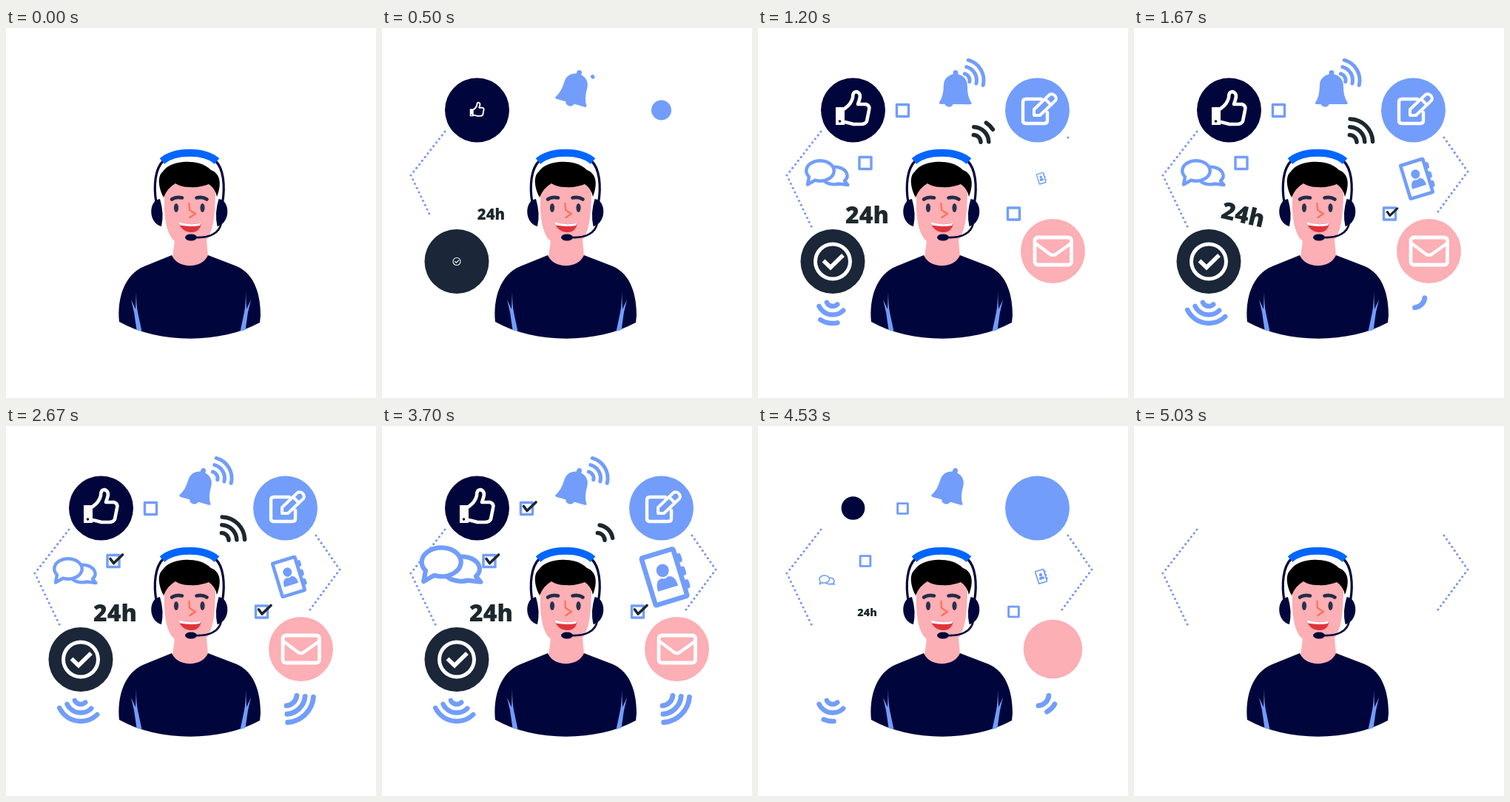
Recreate the animation shown at these times as an HTML page with a canvas. Size 500 by 500 pixels, loop 5.06 s.

```html
<!DOCTYPE html>
<html lang="en">
<head>
<meta charset="utf-8">
<title>Support agent</title>
<style>
html, body { margin: 0; width: 100%; height: 100%; overflow: hidden; background: #fff; }
canvas { display: block; width: 500px; height: 500px; }
</style>
</head>
<body>
<canvas id="stage" width="500" height="500"></canvas>
<script>
const ctx = document.getElementById('stage').getContext('2d');
const LOOP = 5060;
const NAVY = '#00063b', DARK = '#1b2638', BLUE = '#729dfb', PINK = '#fcafb4';
const WHITE = '#fff', INK = '#1d282e';
const RAD = Math.PI / 180;

// Motion rules: t and all times in ms.
function ease(t, from, to) {
  const p = Math.min(1, Math.max(0, (t - from) / (to - from)));
  return p * p * (3 - 2 * p);
}

// Grows from 0 to 1 at one time and shrinks back at another.
const life = (t, enter, leave, dur = 340) =>
  ease(t, enter, enter + dur) * (1 - ease(t, leave, leave + dur));

const bump = (t, from, to) =>
  t < from || t > to ? 0 : Math.sin(Math.PI * (t - from) / (to - from)) ** 2;

const swing = (t, from, period, turns) =>
  t < from || t > from + period * turns ? 0 : Math.sin(2 * Math.PI * (t - from) / period);

function fill(d, color) {
  ctx.fillStyle = color;
  ctx.fill(new Path2D(d));
}

function line(d, color, width) {
  ctx.strokeStyle = color;
  ctx.lineWidth = width;
  ctx.stroke(new Path2D(d));
}

function oval(x, y, rx, ry, color) {
  ctx.fillStyle = color;
  ctx.beginPath();
  ctx.ellipse(x, y, rx, ry, 0, 0, 2 * Math.PI);
  ctx.fill();
}

function rounded(x, y, w, h, r, color, width) {
  ctx.strokeStyle = color;
  ctx.lineWidth = width;
  ctx.beginPath();
  ctx.roundRect(x, y, w, h, r);
  ctx.stroke();
}

// Scales and turns a drawing about a point in stage coordinates.
function about(x, y, scale, draw, deg = 0) {
  if (scale < 0.01) return;
  ctx.save();
  ctx.translate(x, y);
  ctx.rotate(deg * RAD);
  ctx.scale(scale, scale);
  ctx.translate(-x, -y);
  draw();
  ctx.restore();
}

function mirrored(axis, draw) {
  draw();
  ctx.save();
  ctx.translate(2 * axis, 0);
  ctx.scale(-1, 1);
  draw();
  ctx.restore();
}

// Three arcs that open one after the other.
function waves(x, y, r, step, from, to, color, width, part) {
  ctx.strokeStyle = color;
  ctx.lineWidth = width;
  for (let i = 0; i < 3; i++) {
    const f = Math.min(1, part * 3 - i);
    if (f < 0.03) continue;
    const mid = (from + to) / 2, half = (to - from) / 2 * f;
    ctx.beginPath();
    ctx.arc(x, y, r + step * i, (mid - half) * RAD, (mid + half) * RAD);
    ctx.stroke();
  }
}

function dots(points, part) {
  const spots = [points[0]];
  for (let i = 1; i < points.length; i++) {
    const [x, y] = points[i - 1], dx = points[i][0] - x, dy = points[i][1] - y;
    const n = Math.round(Math.hypot(dx, dy) / 6.2);
    for (let k = 1; k <= n; k++) spots.push([x + dx * k / n, y + dy * k / n]);
  }
  for (const [x, y] of spots.slice(0, Math.round(spots.length * part))) {
    oval(x, y, 1.6, 1.6, '#7b97ec');
  }
}

function person() {
  fill('M214 210 V245 C215 265 219 281 228 288 L225 309 C232 328 265 328 273 309 L271 286 C280 275 283 255 283 212 L248 200 Z', PINK);
  fill('M224 307 C232 326 265 326 273 307 L312 322 C337 333 344 362 344 388 L343 398 C290 427 206 427 153 397 C150 365 160 333 187 322 Z', NAVY);
  mirrored(250, () => fill('M176 356 Q176 374 178 384 L183.500 410 L176.500 408 L173 384 L169 367 L175 380 Z', BLUE));
  mirrored(247.75, () => {
    line('M203 236 C199 212 202 190 212 180', NAVY, 3.2);
    fill('M208 231 C192 233 192 264 210 268 Q214 250 208 231 Z', NAVY);
    oval(230, 243, 3.1, 6, '#2b3150');
    line('M224 231.500 Q230 227.500 238 229.500', '#252b48', 4.6);
  });
  fill('M213 229 C206 216 204 200 212 194 C218 185 233 180 248 181 C262 181 271 186 277 192 C291 197 291 213 285 228 Q283 217 274 211 Q262 216 248 215 Q236 215 229 210 Q218 216 213 229 Z', '#000');
  ctx.lineCap = 'butt';
  line('M211 180 C228 165 268 165 285 180', '#0066ff', 10);
  ctx.lineCap = 'round';
  line('M291 263 C289 277 275 284 256 283', NAVY, 2.6);
  oval(250, 283, 8, 4.6, NAVY);
  line('M247.500 237 L248 246 M249 246.500 L256 251 L248.500 256', '#f9735a', 2.3);
  fill('M233 262 Q250 268 264 263 Q262 277 249 276 Q237 275 233 262 Z', '#e0343c');
  fill('M233 262 Q250 268 264 263 L262 267 Q249 269 235 266.500 Z', WHITE);
}

function thumb() {
  fill('M105 107 H117 V131 H105 Z', WHITE);
  oval(110.5, 126, 1.8, 1.8, NAVY);
  line('M117 109 Q126 103 128 94 Q128 86 133 86 Q140 88 137 97 L135 103 H146 Q152 105 150 111 L147 126 Q145 130 139 130 H129 Q122 128 117 127', WHITE, 4.6);
}

function tick() {
  oval(101, 315.5, 26, 26, WHITE);
  oval(101, 315.5, 21, 21, DARK);
  ctx.lineCap = 'butt';
  ctx.lineJoin = 'miter';
  line('M88.500 314.500 L98 323.500 L115 307', WHITE, 5.6);
}

function edit() {
  line('M383 96 H362 Q358 96 358 100 V125 Q358 129 362 129 H387 Q391 129 391 125 V114', WHITE, 4.4);
  line('M373 118 V110 L394 90 Q397 88 401 91 Q404 95 402 98 L381 118 Z M388 96 L396 104', WHITE, 4);
}

function envelope() {
  rounded(374, 283, 49.5, 37, 4, WHITE, 4.8);
  line('M375 291 L395 306 Q398.500 308 402 306 L423 291', WHITE, 4.4);
}

function bubble(x, y, rx, ry, start, end, tx, ty) {
  ctx.beginPath();
  ctx.ellipse(x, y, rx, ry, 0, start, end + 2 * Math.PI);
  ctx.lineTo(tx, ty);
  ctx.closePath();
  ctx.fillStyle = WHITE;
  ctx.fill();
  ctx.strokeStyle = BLUE;
  ctx.lineWidth = 4.4;
  ctx.stroke();
}

function chat() {
  bubble(103, 199.5, 17.5, 11.8, 1.2, 0.65, 121.5, 212);
  bubble(84, 193, 18.7, 13.7, 2.5, 1.95, 67, 211.5);
}

function book() {
  rounded(366, 180, 31.5, 47, 1, BLUE, 4.6);
  for (const y of [190, 203, 216]) line(`M400.500 ${y - 2} v4`, BLUE, 5);
  oval(382, 197, 6, 6.2, BLUE);
  fill('M372 215 Q372 204 379 204 Q382 206 385 204 Q392 204 392 215 Z', BLUE);
}

function bell(deg) {
  about(267, 59, 1, () => oval(267, 102, 6, 5.5, BLUE), 12 + deg / 3);
  about(267, 59, 1, () => {
    oval(267, 61, 3.5, 4, BLUE);
    fill('M245 101 Q251 93 251 78 C251 57 283 57 283 78 Q283 93 289 101 Q289 103 287 103 H247 Q245 103 245 101 Z', BLUE);
  }, deg);
}

function disc(x, y, color, size, icon, iconSize) {
  about(x, y, size, () => oval(x, y, 43.5, 43.5, color));
  about(x, y, iconSize, icon);
}

function box(x, y, size, mark) {
  about(x, y, size, () => rounded(x - 8, y - 8, 16, 16, 0, BLUE, 3.4));
  about(x, y, mark, () => line(`M${x - 4} ${y - 3} l4.500 6 l12 -11.500`, INK, 3.7));
}

function draw(t) {
  ctx.fillStyle = WHITE;
  ctx.fillRect(0, 0, 500, 500);
  ctx.lineJoin = ctx.lineCap = 'round';

  dots([[85, 140], [39, 199], [72, 268]], ease(t, 30, 640));
  dots([[419, 148], [451, 194], [411, 248]], ease(t, 1130, 1650));
  person();

  const swell = 1 + 0.2 * bump(t, 3850, 4500);
  disc(128.5, 111, NAVY, life(t, 30, 4330),
    thumb, life(t, 350, 3970) + 0.17 * bump(t, 600, 1060));
  disc(101, 315.5, DARK, life(t, 60, 4120), tick, life(t, 400, 3800));
  disc(377.5, 111, BLUE, life(t, 360, 4620, 380), edit, life(t, 480, 4200) * swell);
  disc(398.5, 301.5, PINK, life(t, 490, 4470), envelope, life(t, 720, 4200) * swell);

  const size = life(t, 620, 4450);
  const keep = 1 - ease(t, 4300, 4550);
  for (const [x, y, at] of [[345.5, 251, 1480], [145, 182.5, 2200], [195.5, 111.5, 2750]]) {
    box(x, y, size, keep * ease(t, at, at + 260));
  }

  const grow = 0.42 * bump(t, 3300, 4150);
  about(93, 215, life(t, 620, 4330) + grow, chat);
  about(383, 203, life(t, 1080, 4330) + grow, book, -17);

  const ring = swing(t, 1030, 540, 2) + swing(t, 3800, 540, 1);
  about(258, 80, life(t, 80, 4560, 420), () => bell(16 - 17 * ring));

  const pulse = 0.86 * (bump(t, 1750, 2550) + bump(t, 2700, 3200));
  about(147.5, 252, life(t, 300, 4350) + pulse, () => {
    ctx.font = '800 32px "Open Sans", "Noto Sans", sans-serif';
    ctx.textAlign = 'center';
    ctx.fillStyle = INK;
    ctx.fillText('24h', 147.5, 263.5);
  }, 13 * swing(t, 1500, 680, 1.5));

  waves(277, 70.5, 9, 9.5, -75, 14, BLUE, 5,
    ease(t, 450, 1070) - ease(t, 4000, 4400));
  waves(291, 154.5, 10, 10.8, -88, -2, INK, 5.5,
    ease(t, 780, 1400) - 0.6 * bump(t, 1900, 2600) - ease(t, 3350, 4180));
  waves(101, 367, 9, 11.5, 46, 154, BLUE, 6.5,
    ease(t, 460, 1500) - ease(t, 4300, 5000));
  waves(378, 363, 15, 11.3, 5, 86, BLUE, 6.8,
    ease(t, 1400, 2120) - ease(t, 4280, 4760));
}

const start = performance.now();
function frame(now) {
  draw(Math.max(0, now - start) % LOOP);
  requestAnimationFrame(frame);
}
draw(0);
requestAnimationFrame(frame);
</script>
</body>
</html>
```
